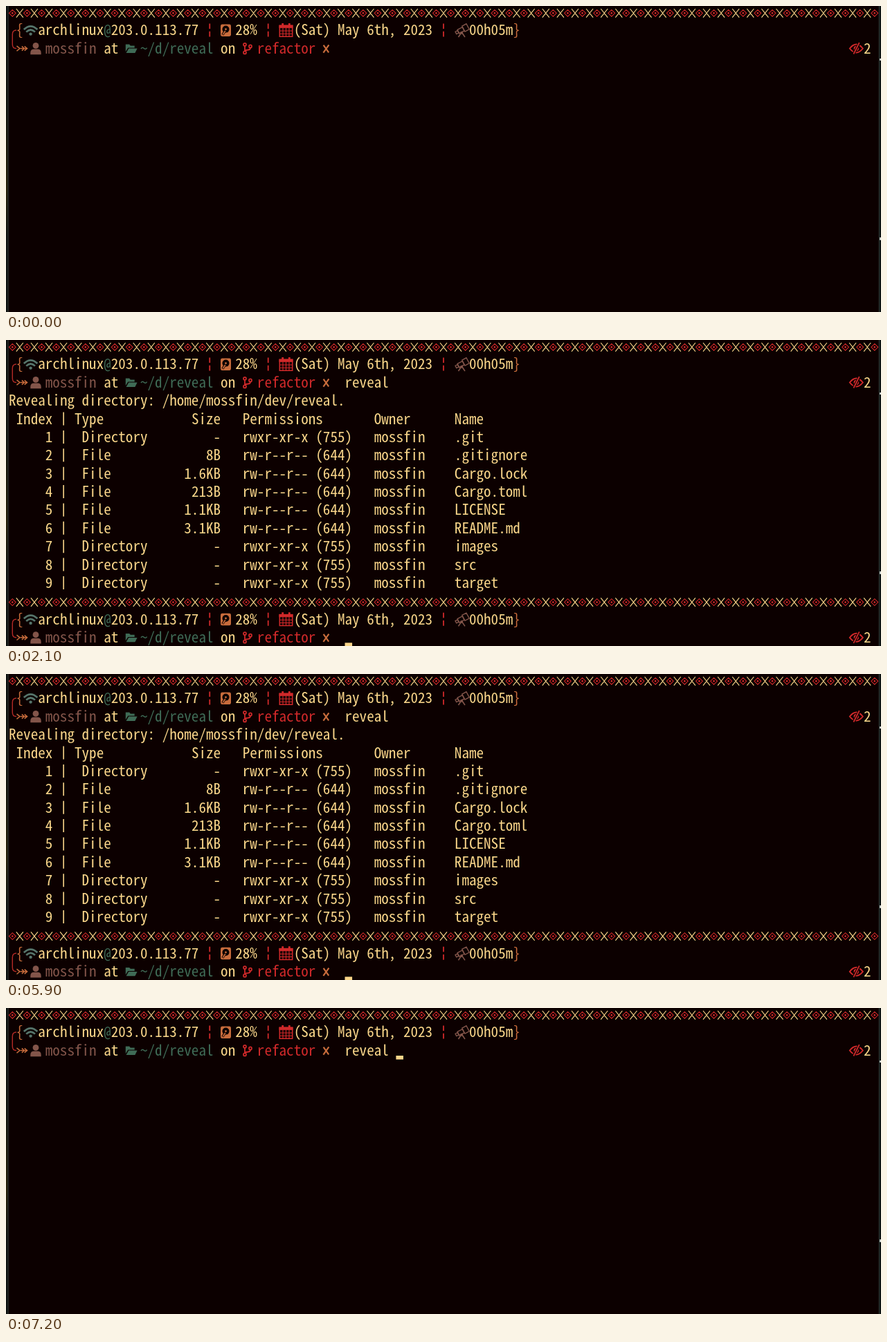
An HTML page for the animation above (8000 ms loop, 1264 by 443 pixels).

```html
<!DOCTYPE html>
<html lang="en">
<head>
<meta charset="utf-8">
<title>Terminal session</title>
<style>
  html, body { margin: 0; width: 100%; height: 100%; overflow: hidden; background: #0c0000; }
  svg { display: block; width: 1264px; height: 443px; }
  text {
    white-space: pre;
    font-family: "Noto Sans Mono CJK JP", "Noto Sans Mono CJK SC", "Noto Sans Mono", monospace;
  }
</style>
</head>
<body>
<svg id="stage" viewBox="0 0 1264 443" xmlns="http://www.w3.org/2000/svg"></svg>
<script>
const LEFT = 4, CELL = 10.555, LINE = 26.38, BASELINE = 16;
const COLS = 119, INPUT_COL = 46;
const LOOP = 8000;
const BG = '#0c0000', CREAM = '#f9d68a', RED = '#d0292a', ORANGE = '#c86c3c',
      BROWN = '#83554a', TEAL = '#3f6b56', WIFI = '#56756b';
const USER = 'mossfin', HOST = '203.0.113.77';

const colX = col => LEFT + col * CELL;
const text = (row, col, str, fill = CREAM) =>
  `<text x="${colX(col)}" y="${BASELINE + row * LINE}" fill="${fill}">${str}</text>`;
const line = (d, color, width) =>
  `<path d="${d}" fill="none" stroke="${color}" stroke-width="${width}"/>`;
const shape = (d, color) => `<path d="${d}" fill="${color}"/>`;
const dot = (x, y, r, color) => `<circle cx="${x}" cy="${y}" r="${r}" fill="${color}"/>`;

// Vertical bars stay inside their line, shorter than the font's own.
const bar = (row, col) =>
  line(`M${colX(col + 0.5)} ${BASELINE + row * LINE - 17}v19`, CREAM, 1.6);
const brokenBar = (row, col) =>
  line(`M${colX(col + 0.5)} ${BASELINE + row * LINE - 17}v7.6m0 3.8v7.6`, RED, 1.8);

function ornament() {
  let diamonds = '', cores = '', crosses = '';
  for (let i = 0; i < COLS; i++) {
    const x = colX(i + 0.5);
    if (i % 2) {
      crosses += `M${x - 5} 4l10 12.6M${x + 5} 4l-10 12.6`;
    } else {
      diamonds += `M${x - 4.9} 10.3l4.9 -4.9l4.9 4.9l-4.9 4.9z`;
      cores += `M${x - 1.7} 10.3l1.7 -1.7l1.7 1.7l-1.7 1.7z`;
    }
  }
  return line(diamonds, RED, 1.05) + shape(cores, RED) + line(crosses, CREAM, 1.15);
}

const icons = {
  connector: line('M15 35Q9.3 35 9.3 41V55.5Q9.3 61.5 15 61.5', '#b32a26', 1.4) +
    line('M15.5 57.8L20 61.5L15.5 65.2M21 61.5H30', ORANGE, 1.5) +
    line('M23 58.3L26 61.5L23 64.7M26.7 58.3L30.5 61.5L26.7 64.7', ORANGE, 1.6),
  wifi: line('M25.8 34Q35.6 24.6 45.4 34', WIFI, 2.7) +
    line('M29.2 37.6Q35.6 31.4 42 37.6', WIFI, 2.7) + dot(35.6, 40.6, 2.2, WIFI),
  disk: `<rect x="310" y="26.5" width="15" height="17.5" rx="2.4" fill="${ORANGE}"/>` +
    dot(317.5, 33.6, 5, BG) + dot(317.5, 33.6, 1.4, ORANGE) +
    line('M312.8 41.6L316.6 36', BG, 3.4) + line('M313.2 41.2L316.8 36', ORANGE, 1.6),
  calendar: line('M395.3 28.5H413.7V44.3H395.3Z', RED, 1.5) +
    shape('M394.5 27.5h20v4.4h-20z', RED) +
    line('M399.7 25v5M409.3 25v5', RED, 2.8) +
    line('M395 36h19M395 40.2h19M400 32v12M404.5 32v12M409 32v12', RED, 1.1),
  telescope: `<g transform="rotate(-28 658 34)">` +
    line('M648.5 32.8h3.6v3.6h-3.6zM652.6 31.6h8v6h-8zM661 30h7v9h-7z', BROWN, 1.4) + '</g>' +
    dot(658.2, 38.8, 2, BROWN) + line('M657.5 39L653.5 45M659 39L663 45', BROWN, 1.6),
  person: dot(43, 57.4, 4.4, BROWN) +
    shape('M35.3 70.3v-2.6q0 -5.2 5 -5.2h5.4q5 0 5 5.2v2.6z', BROWN),
  folder: shape('M172.8 66V55.6h5.4l1.6 1.8h5.9v3.2h-9.4z', TEAL) +
    shape('M177.2 61.6h12.4l-3.2 6.4h-12.8z', TEAL),
  branch: line('M345 57v9M353 60.4q0 3 -3.5 3.1q-4.2 0 -4.4 2.5', RED, 1.8) +
    [[345, 55.8], [345, 67.4], [353, 58.4]].map(([x, y]) =>
      `<circle cx="${x}" cy="${y}" r="2" fill="${BG}" stroke="${RED}" stroke-width="1.7"/>`).join(''),
  cross: line('M458.6 56.6L466.2 67.4M466.4 56.4L458.4 67.6', ORANGE, 2.2),
  hiddenEye: line('M1218.8 61.5Q1228.3 49.5 1237.8 61.5Q1228.3 73.5 1218.8 61.5Z', RED, 1.9) +
    dot(1228.3, 61.5, 3.7, RED) +
    line('M1233.5 52.5L1223.8 70', BG, 4) + line('M1232.7 53L1224.4 69.5', RED, 1.7),
};

const prompt = ornament() + Object.values(icons).join('') +
  text(1, 1, '{', ORANGE) + text(1, 4, 'archlinux') + text(1, 13, '@', TEAL) + text(1, 14, HOST) +
  [27, 35, 59].map(col => brokenBar(1, col)).join('') +
  text(1, 31, '28%') + text(1, 39, '(Sat) May 6th, 2023') +
  text(1, 63, '00h05m') + text(1, 69, '}', ORANGE) +
  text(2, 5, USER, BROWN) + text(2, 13, 'at') + text(2, 18, '~/d/reveal', TEAL) +
  text(2, 29, 'on') + text(2, 34, 'refactor', RED) + text(2, 117, '2');

const entries = [
  ['.git'], ['.gitignore', '8B'], ['Cargo.lock', '1.6KB'], ['Cargo.toml', '213B'],
  ['LICENSE', '1.1KB'], ['README.md', '3.1KB'], ['images'], ['src'], ['target'],
];

function listing() {
  const record = (row, index, typeCol, type, size, mode, owner, name) =>
    text(row, 6 - index.length, index) + bar(row, 7) + text(row, typeCol, type) +
    text(row, 29 - size.length, size) + text(row, 32, mode) +
    text(row, 50, owner) + text(row, 61, name);
  const rows = entries.map(([name, size], i) => record(
    5 + i, String(i + 1), 10, size ? 'File' : 'Directory', size || '-',
    size ? 'rw-r--r-- (644)' : 'rwxr-xr-x (755)', USER, name));
  return text(3, 0, `Revealing directory: /home/${USER}/dev/reveal.`) +
    record(4, 'Index', 9, 'Type', 'Size', 'Permissions', 'Owner', 'Name') + rows.join('');
}

const windowEdges = `
  <defs><linearGradient id="desk" x2="0" y2="1">
    <stop offset="0" stop-color="#0b0f0e"/><stop offset=".35" stop-color="#12140d"/>
    <stop offset=".6" stop-color="#29220c"/><stop offset=".75" stop-color="#0f120f"/>
    <stop offset="1" stop-color="#0c1010"/>
  </linearGradient></defs>
  <rect width="2.5" height="443" fill="url(#desk)"/>
  <rect x="1262" width="2" height="443" fill="#0d1414"/>
  <path d="M3 0V443M1261.3 0V443" stroke="#34423f"/>
  <path d="M1263 76v3M1263 335v4" stroke="#c9cfcb" stroke-width="2"/>`;

const stage = document.getElementById('stage');

// Pick the size at which one glyph fills one terminal cell.
const pen = document.createElement('canvas').getContext('2d');
pen.font = '100px "Noto Sans Mono CJK JP", "Noto Sans Mono CJK SC", "Noto Sans Mono", monospace';
stage.setAttribute('font-size', CELL * 100 / pen.measureText('0').width);

stage.innerHTML = `<rect width="1264" height="443" fill="${BG}"/>${windowEdges}${prompt}
  <g id="output">${listing()}<g transform="translate(0 ${14 * LINE})">${prompt}</g></g>
  <text id="typed" x="${colX(INPUT_COL)}" y="${BASELINE + 2 * LINE}" fill="${CREAM}"></text>
  <rect id="cursor" width="${CELL}" height="5.5" fill="${CREAM}"/>`;

const [output, typed, cursor] = ['output', 'typed', 'cursor'].map(id => document.getElementById(id));

// [start ms, command typed so far, cursor visible, listing visible]
const steps = [
  [0, '', 0, 0],
  [400, 'r', 1, 0], [500, 're', 1, 0], [800, 'rev', 1, 0], [1000, 'reve', 1, 0],
  [1200, 'revea', 1, 0], [1400, 'reveal', 1, 0], [1900, 'reveal', 0, 0],
  [2100, 'reveal', 1, 1], [2700, 'reveal', 0, 1], [3100, 'reveal', 1, 1],
  [3600, 'reveal', 0, 1], [4100, 'reveal', 1, 1], [4600, 'reveal', 0, 1],
  [5100, 'reveal', 1, 1], [5600, 'reveal', 0, 1], [5900, 'reveal', 1, 1],
  [6000, '', 1, 0], [6500, 'r', 1, 0], [6600, 're', 1, 0], [6800, 'reve', 1, 0],
  [6900, 'revea', 1, 0], [7100, 'reveal', 1, 0], [7200, 'reveal ', 1, 0],
];

const show = (el, on) => el.setAttribute('visibility', on ? 'visible' : 'hidden');
let current;

function render(time) {
  const step = steps.findLast(([start]) => start <= time);
  if (step === current) return;
  current = step;
  const [, command, blinkOn, listed] = step;
  typed.textContent = command;
  show(output, listed);
  show(cursor, blinkOn);
  cursor.setAttribute('x', colX(INPUT_COL + (listed ? 0 : command.length)));
  cursor.setAttribute('y', 69 + (listed ? 14 * LINE : 0));
}

const began = performance.now();
function tick() {
  render((performance.now() - began) % LOOP);
  requestAnimationFrame(tick);
}
tick();
</script>
</body>
</html>
```
